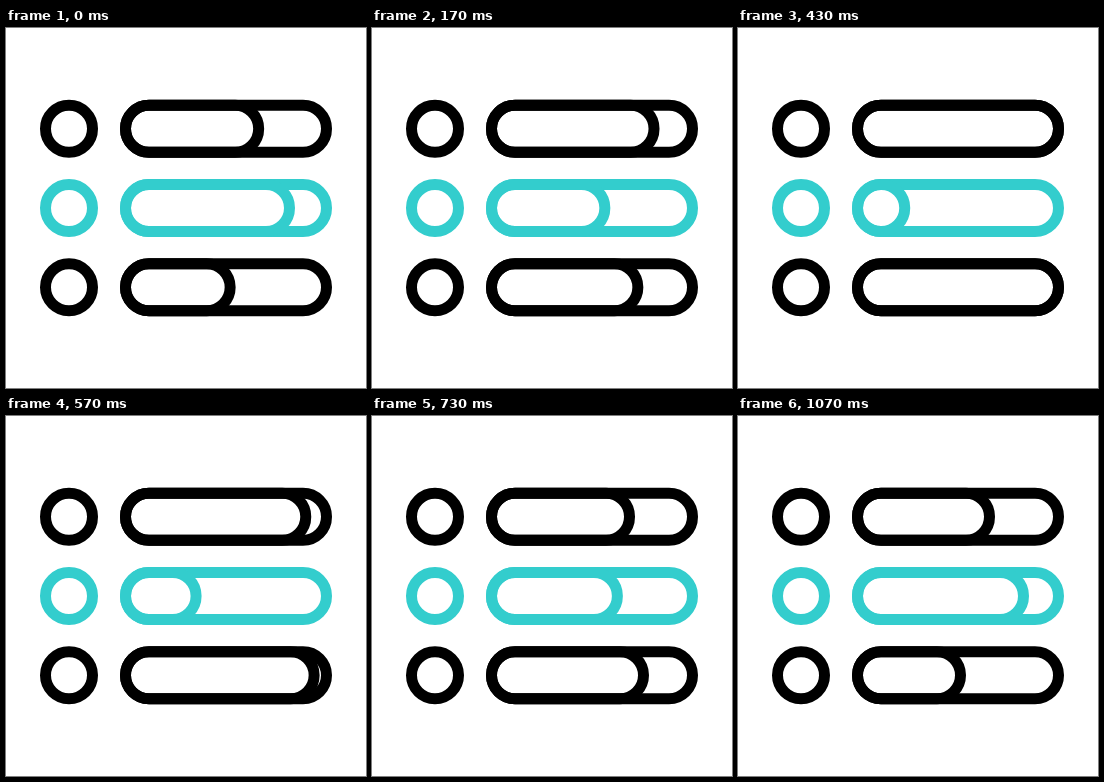
An HTML page with a canvas for the animation above (1670 ms loop, 360 by 360 pixels).

```html
<!DOCTYPE html>
<html lang="en">
<head>
<meta charset="utf-8">
<title>Sliding list</title>
<style>
  html, body { margin: 0; width: 100%; height: 100%; overflow: hidden; background: #fff; }
  canvas { display: block; width: 360px; height: 360px; }
</style>
</head>
<body>
<canvas></canvas>
<script>
const LOOP = 1670, STEP = 100 / 3, LAST_STEP = 32;
const LINE = 11, RADIUS = 23.5;
const LEFT = 119.5, RIGHT = 320.5;

// Edge positions are stroke centres; "back" and "end" are steps of the return move.
const rows = [
  { y: 100.8, color: '#000', rest: 251.5, far: RIGHT, back: 13, end: 24 },
  { y: 180, color: '#33cdcd', rest: 285.5, far: 166.5, back: 12.6, end: 28 },
  { y: 259.2, color: '#000', rest: 222.5, far: RIGHT, back: 13, end: 31 }
];

const canvas = document.querySelector('canvas');
const ctx = canvas.getContext('2d');
const scale = window.devicePixelRatio || 1;
canvas.width = canvas.height = 360 * scale;
ctx.scale(scale, scale);

function ease(from, to, step) {
  const u = Math.min(1, Math.max(0, (step - from) / (to - from)));
  return u * u * (3 - 2 * u);
}

function pill(left, right, y) {
  ctx.beginPath();
  ctx.roundRect(left, y - RADIUS, right - left, 2 * RADIUS, RADIUS);
  ctx.stroke();
}

function drawRow({ y, color, rest, far, back, end }, step) {
  const amount = ease(-1, 12, step) - ease(back, end, step);
  ctx.strokeStyle = color;
  pill(63 - RADIUS, 63 + RADIUS, y);
  pill(LEFT, RIGHT, y);
  pill(LEFT, rest + (far - rest) * amount, y);
}

function draw(now) {
  // Thirty steps a second, switching on whole hundredths of a second.
  const time = Math.floor((now % LOOP) / 10) * 10;
  const step = Math.min(LAST_STEP, Math.floor((time + 5) / STEP));
  ctx.fillStyle = '#fff';
  ctx.fillRect(0, 0, 360, 360);
  ctx.lineWidth = LINE;
  for (const row of rows) drawRow(row, step);
}

function tick() {
  draw(performance.now());
  requestAnimationFrame(tick);
}
tick();
</script>
</body>
</html>
```
